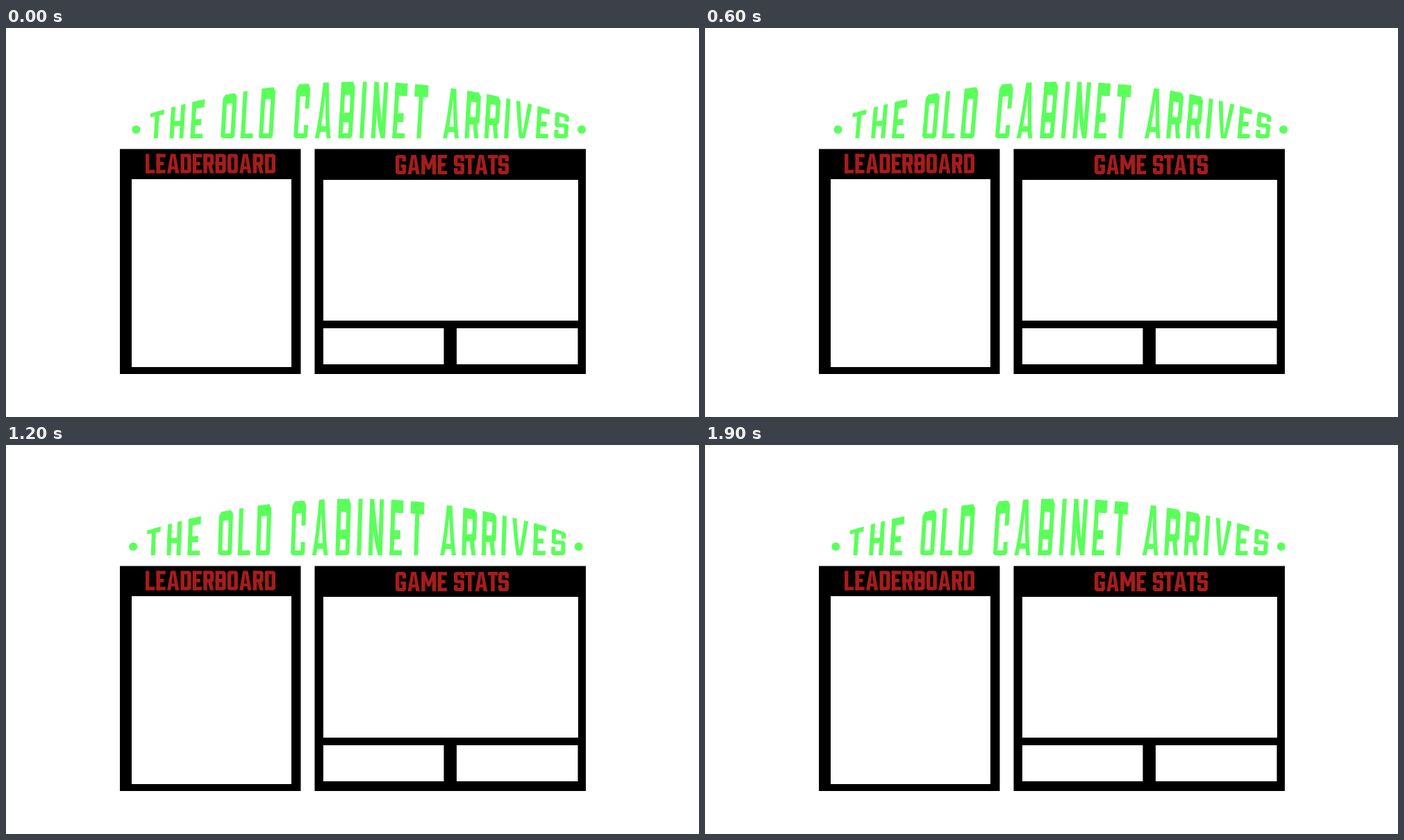
Write an HTML page with a canvas that moves like this. It is 998 px wide and 561 px high and loops after 2000 ms.

```html
<!DOCTYPE html>
<html lang="en">
<head>
<meta charset="utf-8">
<title>Scoreboard</title>
<style>
html, body { margin: 0; width: 100%; height: 100%; overflow: hidden; background: #fff; }
canvas { display: block; }
</style>
</head>
<body>
<canvas id="stage" width="998" height="561" role="img"
  aria-label="The Old Cabinet Arrives. Leaderboard. Game Stats."></canvas>
<script>
const ctx = document.getElementById('stage').getContext('2d');
const GREEN = '#5aff5a', RED = '#a61c1c';
const LOOP = 2000, STEP = 100, BASE = 159;

// Sway of the title: [time, offset]
const SWAY = [[0, 0], [100, -1], [600, 4.2], [700, 4.5], [800, 4], [1200, -4.5],
  [1300, -4.3], [1600, -2.4], [1900, 0.8], [2000, 0]];

const HEAD = { unit: 15, stem: 5.4, bar: 0.18, cx: 2.5, cy: 0.09 };
const TITLE = { unit: 20, stem: 6, bar: 0.16, cx: 3.2, cy: 0.06 };
const RATIO = { A: 1.15, V: 1.15, M: 1.4, E: 0.88, L: 0.88, T: 0.97 };

const box = (a, b, c, d) => [[[a, b], [c, b], [c, d], [a, d]]];

// Rectangle with cut corners on the right, and on the left too if asked
function cut(a, b, c, d, x, y, left) {
  const lx = left ? x : 0, ly = left ? y : 0;
  return [[a + lx, b], [c - x, b], [c, b + y], [c, d - y],
    [c - x, d], [a + lx, d], [a, d - ly], [a, b + ly]];
}

// Each glyph is a list of shapes, each shape a list of even-odd loops.
// x runs over the width in pixels, y from 0 (baseline) to 1 (cap height).
function glyph(ch, f) {
  const w = widthOf(ch, f), s = f.stem, t = f.bar, q = f.cx, p = f.cy, m = w / 2;
  const ring = (b, d, left) => [
    cut(0, b, w, d, q, p, left),
    cut(s, b + t, w - s, d - t, q * 0.3, p * 0.3, left)
  ];
  const hook = low => [[
    [w, 0.66], [w, 1 - p], [w - q, 1], [q, 1], [0, 1 - p], [0, p], [q, 0],
    [w - q, 0], [w, p], [w, low], [w - s, low], [w - s, t], [s, t],
    [s, 1 - t], [w - s, 1 - t], [w - s, 0.66]
  ]];
  const post = box(0, 0, s, 1), post2 = box(w - s, 0, w, 1);
  const foot = box(0, 0, w, t), roof = box(0, 1 - t, w, 1);
  const mid = (a, b) => box(a, 0.5 - t / 2, b, 0.5 + t / 2);
  const peak = [[0, 0], [m - s * 0.65, 1], [m + s * 0.65, 1], [w, 0],
    [w - s, 0], [m, 0.85], [s, 0]];
  switch (ch) {
    case 'A': return [[peak], box(w * 0.2, 0.2, w * 0.8, 0.2 + t * 0.85)];
    case 'V': return [[peak.map(([x, y]) => [x, 1 - y])]];
    case 'B': return [ring(0, 0.5 + t / 2), ring(0.5 - t / 2, 1)];
    case 'C': return [hook(0.36)];
    case 'G': return [hook(0.5), box(m, 0.5 - t * 0.85, w, 0.5)];
    case 'D': return [ring(0, 1)];
    case 'O': return [ring(0, 1, true)];
    case 'E': return [post, foot, roof, mid(0, w * 0.82)];
    case 'H': return [post, post2, mid(0, w)];
    case 'I': return [post];
    case 'L': return [post, foot];
    case 'T': return [roof, box(m - s / 2, 0, m + s / 2, 1)];
    case 'N': return [post, post2, [[[0, 1], [s, 1], [w, 0], [w - s, 0]]]];
    case 'M': return [post, post2, [[[0, 1], [s, 1], [m, 0.5], [w - s, 1], [w, 1],
      [m + s * 0.3, 0.25], [m - s * 0.3, 0.25]]]];
    case 'R': return [ring(0.4, 1), post,
      [[[w - s * 1.6, 0.5], [w - s * 0.6, 0.5], [w, 0], [w - s, 0]]]];
    case 'S': {
      const lo = 0.5 - t / 2, hi = 0.5 + t / 2;
      return [[[
        [w, 0.68], [w, 1 - p], [w - q, 1], [q, 1], [0, 1 - p], [0, lo + p], [q, lo],
        [w - s, lo], [w - s, t], [s, t], [s, 0.32], [0, 0.32], [0, p], [q, 0],
        [w - q, 0], [w, p], [w, hi - p], [w - q, hi], [s, hi], [s, 1 - t],
        [w - s, 1 - t], [w - s, 0.68]
      ]]];
    }
  }
}

function widthOf(ch, f) {
  return ch === 'I' ? f.stem : f.unit * (RATIO[ch] || 1);
}

function trace(loop, x0, warp) {
  loop.forEach(([x, y], i) => {
    const [nx, ny] = loop[(i + 1) % loop.length];
    for (let k = 0; k < 8; k++) {
      const a = k / 8;
      const pt = warp(x0 + x + (nx - x) * a, y + (ny - y) * a);
      if (i + k) ctx.lineTo(...pt); else ctx.moveTo(...pt);
    }
  });
  ctx.closePath();
}

// Sets a word from left to right edge with even gaps
function word(text, left, right, font, warp) {
  const chars = [...text];
  const ink = chars.reduce((sum, ch) => sum + widthOf(ch, font), 0);
  const gap = (right - left - ink) / (chars.length - 1);
  let x = left;
  for (const ch of chars) {
    for (const shape of glyph(ch, font)) {
      ctx.beginPath();
      shape.forEach(loop => trace(loop, x, warp));
      ctx.fill('evenodd');
    }
    x += widthOf(ch, font) + gap;
  }
}

function sway(t) {
  const i = SWAY.findIndex(([time]) => time > t);
  const [t0, a] = SWAY[i - 1], [t1, b] = SWAY[i];
  return a + (b - a) * (t - t0) / (t1 - t0);
}

function title(shift) {
  const arch = (x, y) => {
    const top = 81.5 - 0.00052 * (x - 503) ** 2;
    const h = 38 * y + (top - 38) * y * y;
    return [x + shift * 0.88 + h * (0.06 + 0.006 * shift), BASE - h];
  };
  ctx.fillStyle = GREEN;
  word('THE', 206, 283, TITLE, arch);
  word('OLD', 309, 384, TITLE, arch);
  word('CABINET', 414, 604, TITLE, arch);
  word('ARRIVES', 629, 809, TITLE, arch);
  for (const x of [187.5, 829]) {
    ctx.beginPath();
    ctx.arc(x + shift * 0.96, 146.5, 6, 0, Math.PI * 2);
    ctx.fill();
  }
}

function rect(color, x0, y0, x1, y1) {
  ctx.fillStyle = color;
  ctx.fillRect(x0, y0, x1 - x0, y1 - y0);
}

function panels() {
  rect('#000', 164, 174.5, 424.5, 499);
  rect('#fff', 181, 218, 411, 489);
  rect('#000', 444.5, 174.5, 835, 499);
  rect('#fff', 457, 219, 824, 422);
  rect('#fff', 457, 433, 630.5, 485);
  rect('#fff', 649, 433, 823.5, 485);
  const flat = base => (x, y) => [x, base - 28 * y];
  ctx.fillStyle = RED;
  word('LEADERBOARD', 201, 388, HEAD, flat(209.5));
  word('GAME', 561, 635, HEAD, flat(211));
  word('STATS', 645, 724, HEAD, flat(211));
}

function draw(now) {
  const t = Math.floor((now % LOOP) / STEP) * STEP;
  rect('#fff', 0, 0, 998, 561);
  title(sway(t));
  panels();
}

const start = performance.now();
function tick() {
  draw(performance.now() - start);
  requestAnimationFrame(tick);
}
tick();
</script>
</body>
</html>
```
